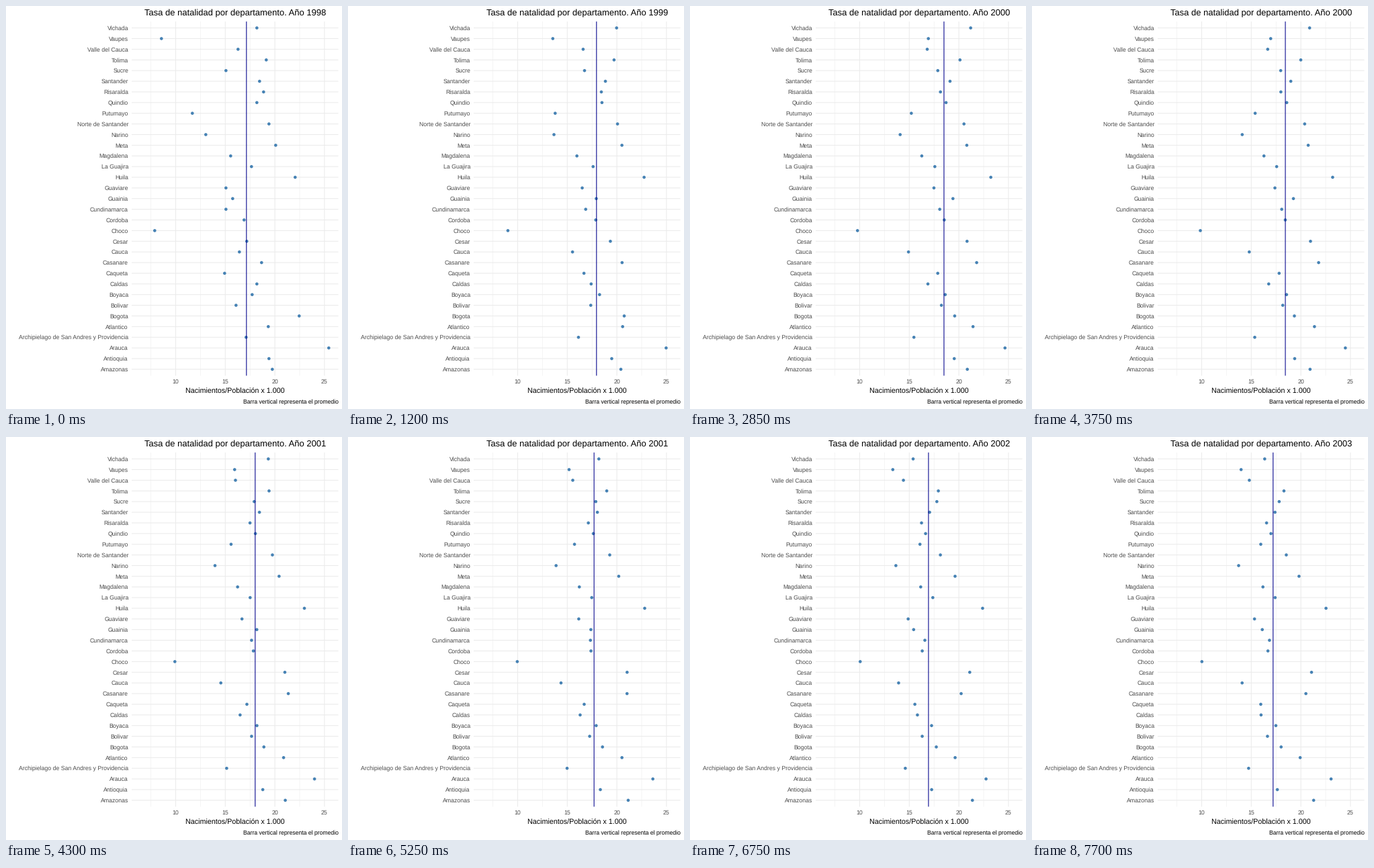
A matplotlib script for the animation above (8 s loop, 500 by 600 pixels).

```python
import matplotlib.pyplot as plt
import numpy as np
from matplotlib.animation import FuncAnimation
from matplotlib.collections import LineCollection

plt.rcParams["font.family"] = "Liberation Sans"
plt.rcParams["text.hinting"] = "none"

PX = 0.72  # points per pixel at 100 dpi
W, H = 500, 600
LEFT, RIGHT, TOP, BOTTOM = 187, 494.5, 23.1, 550.4
CENTRE = (LEFT + RIGHT) / 2
FIRST_YEAR = 1998
LEAD, MOVE, PERIOD = 10, 20, 31  # frames: opening pause, transition, transition + pause
GREY = "#4d4d4d"
GRID = "#ebebeb"

# Key points of each dot's path, as pixels along the axis: start, crest, trough
PATHS = {
    "Vichada": (373, 419, 331),
    "Vaupes": (231, 359, 301),
    "Valle del Cauca": (345, 353, 317),
    "Tolima": (387, 402, 369),
    "Sucre": (327, 370, 367),
    "Santander": (377, 387, 356),
    "Risaralda": (383, 372, 344),
    "Quindio": (373, 381, 350),
    "Putumayo": (277, 331, 342),
    "Norte de Santander": (391, 408, 372),
    "Narino": (297, 313, 306),
    "Meta": (401, 412, 394),
    "Magdalena": (334, 345, 343),
    "La Guajira": (365, 364, 361),
    "Huila": (430, 448, 435),
    "Guaviare": (327, 364, 324),
    "Guainia": (337, 393, 332),
    "Cundinamarca": (327, 373, 349),
    "Cordoba": (354, 379, 345),
    "Choco": (221, 250, 253),
    "Cesar": (358, 414, 416),
    "Cauca": (347, 324, 310),
    "Casanare": (380, 428, 403),
    "Caqueta": (325, 370, 334),
    "Caldas": (373, 353, 338),
    "Boyaca": (366, 380, 359),
    "Bolivar": (342, 375, 345),
    "Bogota": (436, 392, 366),
    "Atlantico": (390, 422, 394),
    "Archipielago de San Andres y Providencia": (357, 332, 320),
    "Arauca": (480, 468, 440),
    "Antioquia": (391, 393, 359),
    "Amazonas": (396, 413, 420),
}
# How far along its path every dot is in each year (1 = crest, 2 = trough)
PROGRESS = (0, 0.82, 1, 1.47, 2, 1.83)

start, crest, trough = np.array(list(PATHS.values())).T + 0.3
row_step = (BOTTOM - TOP) / (len(PATHS) + 0.2)
rows = TOP + row_step * (0.6 + np.arange(len(PATHS)))

fig = plt.figure(figsize=(W / 100, H / 100), dpi=100, facecolor="white")
ax = fig.add_axes([0, 0, 1, 1])
ax.set(xlim=(0, W), ylim=(H, 0))
ax.axis("off")


def axis_x(value):
    return 252.5 + 14.76 * (value - 10)


def label(x, baseline, text, size, color="black", ha="center"):
    return ax.text(x, baseline, text, fontsize=size * PX, color=color, ha=ha, va="baseline")


def vertical(x):
    return [(x, TOP), (x, BOTTOM)]


def lines(segments, width, color=GRID, zorder=1):
    collection = LineCollection(segments, colors=color, linewidths=width * PX,
                                capstyle="butt", snap=False, zorder=zorder)
    return ax.add_collection(collection)


def positions(index):
    p = PROGRESS[index]
    if p <= 1:
        return start + p * (crest - start)
    return crest + (p - 1) * (trough - crest)


lines([vertical(axis_x(v)) for v in np.arange(7.5, 25, 5)], 0.53)
lines([vertical(axis_x(v)) for v in range(10, 30, 5)], 1.07)
lines([[(LEFT, y), (RIGHT, y)] for y in rows], 1.07)

for name, y in zip(PATHS, rows):
    label(182, y + 3.2, name, 8.8, GREY, "right")
for v in range(10, 30, 5):
    label(axis_x(v), 562, str(v), 8.8, GREY)
label(CENTRE, 576, "Nacimientos/Población x 1.000", 10.8)
label(RIGHT, 592, "Barra vertical representa el promedio", 8.6, ha="right")
title = label(CENTRE, 14, "", 13)

# One colour per dot keeps sub-pixel placement
dots = ax.scatter(start, rows, s=(4.6 * PX) ** 2, c=["steelblue"] * len(rows),
                  linewidths=0, zorder=3)
mean_line = lines([], 1.07, "darkblue", zorder=4)


def update(frame):
    index, step = divmod(max(0, frame - LEAD), PERIOD)
    step = min(step, MOVE)
    t = step / MOVE
    x = (1 - t) * positions(index) + t * positions(index + 1)
    dots.set_offsets(np.column_stack([x, rows]))
    mean_line.set_segments([vertical(x.mean())])
    year = FIRST_YEAR + index + (step > MOVE // 2)
    title.set_text(f"Tasa de natalidad por departamento. Año {year}")
    return dots, mean_line, title


anim = FuncAnimation(fig, update, frames=160, interval=50, repeat=True,
                     repeat_delay=0, blit=False)
plt.show()
```
